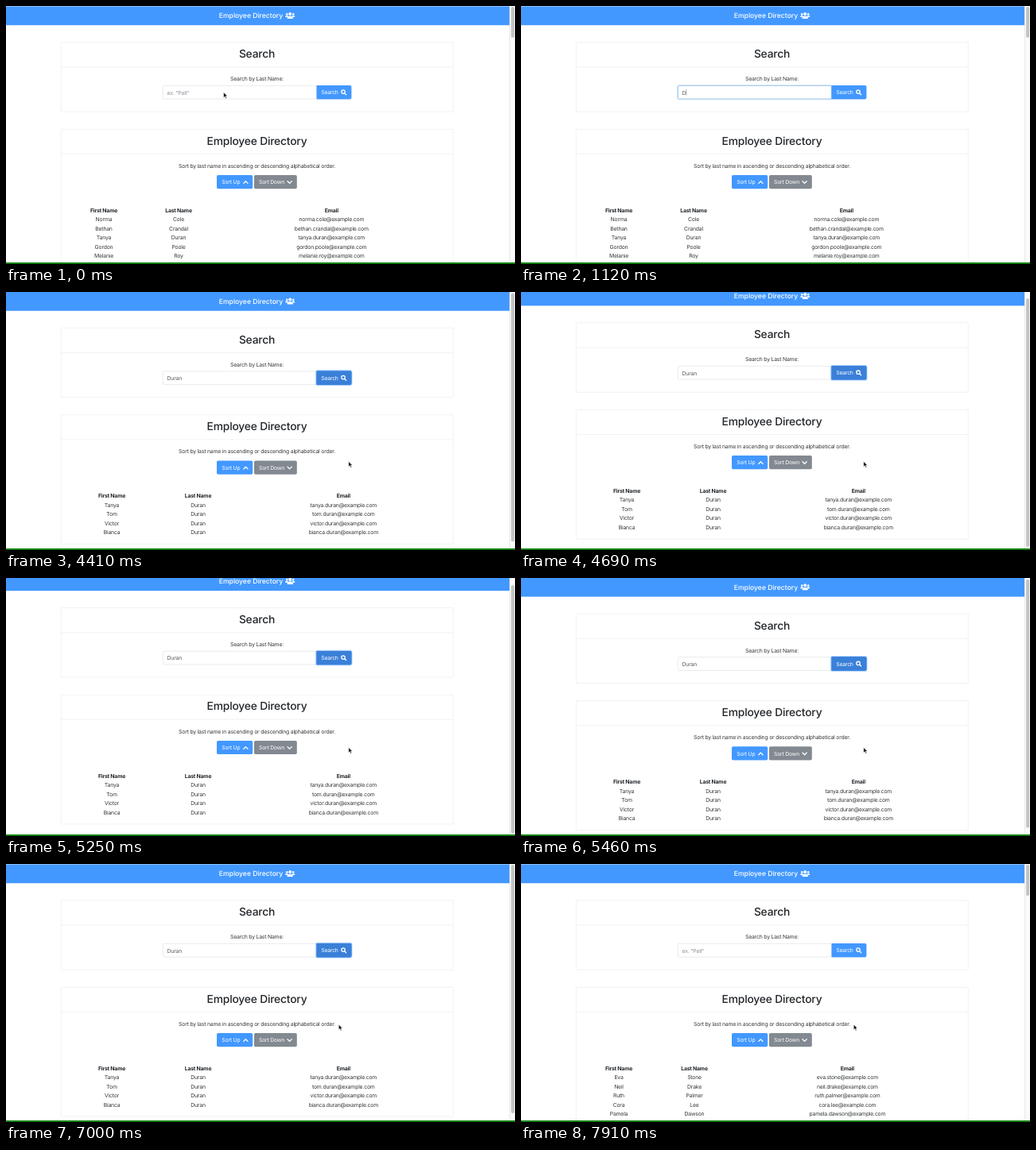
Recreate the animation shown at these times as an HTML page. Size 640 by 325 pixels, loop 8000 ms.

```html
<!DOCTYPE html>
<html lang="en">
<head>
<meta charset="utf-8">
<title>Employee Directory</title>
<style>
html, body { margin: 0; width: 100%; height: 100%; overflow: hidden; background: #fff; }
svg { display: block; width: 640px; height: 325px; }
text { font: 6.85px Inter, "Open Sans", sans-serif; letter-spacing: -.029em; fill: #33373b; text-rendering: geometricPrecision; }
.mid text, text.mid { text-anchor: middle; }
text.h { font-size: 13.8px; font-weight: 500; letter-spacing: -.0135em; fill: #212529; }
text.brand { font-size: 8.6px; font-weight: 500; letter-spacing: 0; }
text.th { font-weight: 700; fill: #212529; }
text.w { fill: #fff; }
.card { fill: none; stroke: #ededee; stroke-width: .7; }
.icon { fill: none; stroke: #fff; stroke-width: 1.3; stroke-linecap: round; stroke-linejoin: round; }
</style>
</head>
<body>
<svg viewBox="0 0 640 325">
  <rect width="640" height="325" fill="#fff"/>
  <g id="page">
    <rect y=".4" width="633" height="23.8" fill="#4298ff"/>
    <text class="brand w mid" x="308" y="15.2">Employee Directory</text>
    <g fill="#fff">
      <circle cx="353.2" cy="10.2" r="1.3"/><circle cx="361.2" cy="10.2" r="1.3"/><circle cx="357.2" cy="10" r="2"/>
      <path d="M351.3 14v-.8a1.5 1.5 0 0 1 1.5-1.5h1q.7 0 1.1.5-1 .6-1.3 1.8zM363.1 14v-.8a1.5 1.5 0 0 0-1.5-1.5h-1q-.7 0-1.1.5 1 .6 1.3 1.8zM353.6 16v-1a2.3 2.3 0 0 1 2.3-2.3h2.6a2.3 2.3 0 0 1 2.3 2.3v1z"/>
    </g>

    <path class="card" d="M69.3 45.7h493v87.5h-493zM69.3 77h493"/>
    <text class="h mid" x="315.5" y="65.3">Search</text>
    <text class="mid" x="315.5" y="94.3">Search by Last Name:</text>
    <rect id="inRing" x="196.2" y="99.2" width="195.2" height="19" rx="2.4" fill="#d3e6fb"/>
    <rect x="197.3" y="100.3" width="193" height="16.8" rx="1.4" fill="#fff" stroke="#dfe2e6" stroke-width=".7"/>
    <rect id="inEdge" x="197.3" y="100.3" width="193" height="16.8" rx="1.4" fill="none" stroke="#8dbcf0" stroke-width=".7"/>
    <text id="value" x="202.6" y="111.6"></text>
    <rect id="caret" y="105.2" width=".5" height="7.4" fill="#555"/>
    <rect id="btnRing" x="389.2" y="98.8" width="46.2" height="19.6" rx="2.8" fill="#a3cbfa"/>
    <path d="M390.5 100h42.1q1.8 0 1.8 1.8v13.8q0 1.8-1.8 1.8h-42.1z" fill="#4298ff"/>
    <path id="btnDark" d="M390.5 100h42.1q1.8 0 1.8 1.8v13.8q0 1.8-1.8 1.8h-42.1z" fill="#3a80d8"/>
    <text class="w" x="396.2" y="111.4">Search</text>
    <g class="icon"><circle cx="424" cy="108.1" r="2.2"/><path d="M425.8 109.9l1.8 1.8"/></g>

    <path id="card2" class="card"/>
    <text class="h mid" x="315.5" y="174.5">Employee Directory</text>
    <text class="mid" x="315.5" y="203.9">Sort by last name in ascending or descending alphabetical order.</text>
    <rect x="265" y="213" width="45.2" height="17.2" rx="1.8" fill="#4298ff"/>
    <text class="w" x="271.2" y="224.4">Sort Up</text>
    <path class="icon" d="M298.8 223.4l2.6-2.7 2.6 2.7"/>
    <rect x="312" y="213" width="53.8" height="17.2" rx="1.8" fill="#828990"/>
    <text class="w" x="318" y="224.4">Sort Down</text>
    <path class="icon" d="M354 220.7l2.6 2.7 2.6-2.7"/>
    <g id="table" class="mid"></g>
  </g>
  <path d="M633 0h7v325h-7z" fill="#fafafa"/>
  <path d="M633.5 0v325" stroke="#e9e9e9"/>
  <rect id="thumb" x="635.1" width="4" rx="2" fill="#c3c3c3"/>
  <rect y="323" width="640" height="2" fill="#128212"/>
  <circle id="ripple" r="13.6" fill="#fff" fill-opacity=".08" stroke="#1c2733" stroke-width=".9"/>
  <path id="arrow" d="M0 0v6.6l1.6-1.4 1.1 2.5 1.1-.5-1.1-2.4h2.1z" fill="#111" stroke="#fff" stroke-width=".5"/>
  <path id="hand" d="M-.7 3.6V.4a.7.7 0 0 1 1.4 0v2.1l2.2.6q.9.3.8 1.2l-.4 2.6h-3.5L-2.3 4.4q.5-1 1.6-.1z" fill="#fff" stroke="#1c2733" stroke-width=".55"/>
</svg>
<script>
const LOOP = 8000, STEP = 70, NAME = "Duran";
const TYPE_AT = 1050, KEY_GAP = 185;
const FOUND_AT = 3220, RELOAD_AT = 7700, FRESH_AT = 7840;

const tables = {
  all: { cols: [123, 217, 409.3], rows: ["Norma Cole", "Bethan Crandal", "Tanya Duran", "Gordon Poole", "Melanie Roy"] },
  found: { cols: [133, 241.5, 424.3], rows: ["Tanya Duran", "Tom Duran", "Victor Duran", "Bianca Duran"] },
  empty: { cols: [154, 300, 446], rows: [] },
  fresh: { cols: [123, 218, 410.4], rows: ["Eva Stone", "Neil Drake", "Ruth Palmer", "Cora Lee", "Pamela Dawson"] }
};

const home = { x: 273.6, y: 108.8 };
const moves = [
  { from: 0, to: 350, x: 266, y: 107 },
  { from: 2240, to: 3080, x: 404, y: 104.6 },
  { from: 3990, to: 4340, x: 430.8, y: 213.5 },
  { from: 5950, to: 6300, x: 418.3, y: 202.2 }
];

const $ = id => document.getElementById(id);
const set = (id, attrs) => { for (const k in attrs) $(id).setAttribute(k, attrs[k]); };
const show = (id, amount) => set(id, { opacity: +amount });
const within = (t, a, b) => t >= a && t < b;

// Smooth 0 to 1 between two times
function ease(t, a, b) {
  const p = Math.min(1, Math.max(0, (t - a) / (b - a)));
  return p * p * (3 - 2 * p);
}
const pulse = (t, on, off, time) => ease(t, on, on + time) - ease(t, off, off + time);

// Down to the end of the page, then back up past the top and settle
function scrollAt(t) {
  if (t < 5600) return -8.6 * ease(t, 4340, 4830) + 11.1 * ease(t, 5200, 5600);
  return t < 6500 ? 2.5 * Math.exp((5600 - t) / 380) : 0;
}

function cursorAt(t) {
  return moves.reduce((pos, m) => {
    const p = ease(t, m.from, m.to);
    return { x: pos.x + (m.x - pos.x) * p, y: pos.y + (m.y - pos.y) * p };
  }, home);
}

let current;
function fillTable(key) {
  if (key === current) return;
  current = key;
  const { cols, rows } = tables[key];
  const line = (cells, y, cls) => cells.map((c, i) =>
    `<text class="${cls}" x="${cols[i]}" y="${y}">${c}</text>`).join("");
  $("table").innerHTML = line(["First Name", "Last Name", "Email"], 259.8, "th") +
    rows.map((name, i) => {
      const [first, last] = name.split(" ");
      const mail = `${first}.${last}@example.com`.toLowerCase();
      return line([first, last, mail], 271.3 + i * 11.52, "");
    }).join("");
  const end = rows.length < 5 ? 272 + rows.length * 11.52 : 340;
  set("card2", { d: `M69.3 155.3h493V${end}h-493zM69.3 186.4h493` });
}

function drawSearch(t) {
  const keys = t < TYPE_AT || t >= RELOAD_AT ? 0 : 1 + Math.floor((t - TYPE_AT) / KEY_GAP);
  const value = $("value");
  value.textContent = keys ? NAME.slice(0, keys) : 'ex. "Pell"';
  value.style.fill = keys ? "#555b61" : "#8a9097";
  set("caret", { x: 202.6 + (keys ? value.getComputedTextLength() + .3 : 0) });
  show("caret", within(t, 490, 3080));

  show("inRing", pulse(t, 420, 3010, 150));
  show("inEdge", pulse(t, 420, 3080, 150));
  show("btnDark", pulse(t, 2800, 7070, 200));
  show("btnRing", pulse(t, 3150, 7070, 150));
}

function drawCursor(t) {
  const { x, y } = cursorAt(t);
  const visible = !within(t, TYPE_AT, 2310);
  const over = within(x, 390, 434) && within(y, 100, 117);
  for (const id of ["arrow", "hand"]) set(id, { transform: `translate(${x} ${y})` });
  show("arrow", visible && !over);
  show("hand", visible && over);
  set("ripple", { cx: x, cy: y - .4 });
  show("ripple", within(t, 350, 560) || within(t, 3150, FOUND_AT));
}

function draw(t) {
  const key = t < FOUND_AT ? "all" : t < RELOAD_AT ? "found" : t < FRESH_AT ? "empty" : "fresh";
  fillTable(key);
  const scroll = scrollAt(t);
  set("page", { transform: `translate(0 ${scroll})` });
  const height = { found: 313, empty: 0 }[key] ?? 39;
  set("thumb", { y: 1 + Math.max(0, -scroll), height });
  drawSearch(t);
  drawCursor(t);
}

const start = performance.now();
function tick(now) {
  const t = Math.max(0, now - start) % LOOP;
  draw(Math.min(7910, Math.floor(t / STEP) * STEP));
  requestAnimationFrame(tick);
}
draw(0);
requestAnimationFrame(tick);
</script>
</body>
</html>
```
